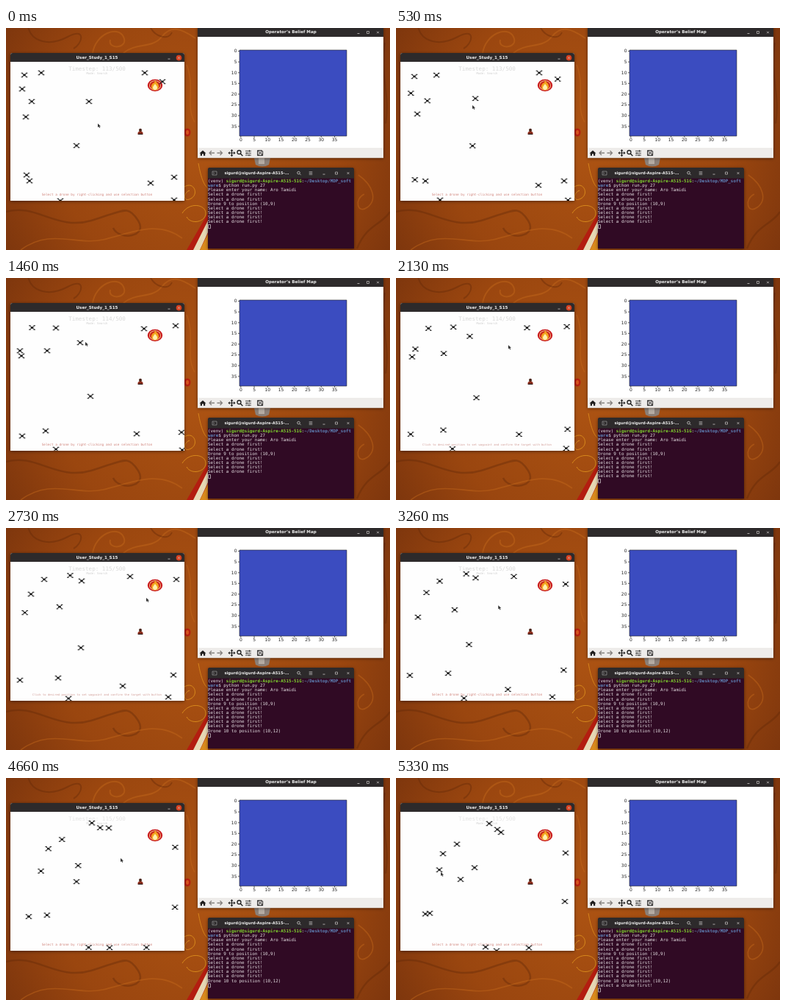
An HTML page with a canvas for the animation above (5.4 s loop, 523x302 px).

```html
<!DOCTYPE html>
<html lang="en">
<head>
<meta charset="utf-8">
<title>Drone study</title>
<style>
html, body { margin: 0; width: 100%; height: 100%; overflow: hidden; background: #9a460f; }
canvas { display: block; }
</style>
</head>
<body>
<canvas id="stage" width="523" height="302"></canvas>
<script>
const W = 523, H = 302, LOOP = 5400;
const SANS = '"DejaVu Sans", sans-serif';
const MONO = '"DejaVu Sans Mono", monospace';
const stage = document.getElementById('stage').getContext('2d');
const back = document.createElement('canvas');
back.width = W;
back.height = H;
let g = back.getContext('2d');

function rect(x, y, w, h, fill) {
  g.fillStyle = fill;
  g.fillRect(x, y, w, h);
}
function oval(x, y, rx, ry, fill) {
  g.fillStyle = fill;
  g.beginPath();
  g.ellipse(x, y, rx, ry, 0, 0, 7);
  g.fill();
}
function shape(d, fill) {
  g.fillStyle = fill;
  g.fill(new Path2D(d));
}
function line(d, color, width = 1) {
  g.strokeStyle = color;
  g.lineWidth = width;
  g.stroke(new Path2D(d));
}
function text(s, x, y, font, fill, align = 'left') {
  g.font = font;
  g.fillStyle = fill;
  g.textAlign = align;
  g.textBaseline = 'middle';
  g.fillText(s, x, y);
}
function frame(x, y, w, h, bar, body) {
  g.save();
  g.shadowColor = 'rgba(0,0,0,.5)';
  g.shadowBlur = 4;
  g.shadowOffsetY = 1;
  g.fillStyle = body;
  g.beginPath();
  g.roundRect(x, y, w, h, [3, 3, 0, 0]);
  g.fill();
  g.restore();
  g.fillStyle = '#2d2a2b';
  g.beginPath();
  g.roundRect(x, y, w, bar, [3, 3, 0, 0]);
  g.fill();
}
function buttons(xMin, xMax, xClose, y) {
  const c = '#c9c5c3';
  line(`M${xMin - 1.5} ${y + 1.5}h3`, c, .8);
  if (xMax) line(`M${xMax - 1.5} ${y - 1.5}h3v3h-3z`, c, .7);
  line(`M${xClose - 1.3} ${y - 1.3}l2.6 2.6m0 -2.6l-2.6 2.6`, c, .8);
}

function wallpaper() {
  const fade = g.createRadialGradient(262, 150, 30, 262, 150, 310);
  fade.addColorStop(0, '#ab5212');
  fade.addColorStop(.6, '#9a460f');
  fade.addColorStop(1, '#7c350d');
  rect(0, 0, W, H, fade);
  const swirl = 'rgba(196,104,28,.45)', dark = 'rgba(98,40,8,.4)';
  line('M118 34C122 8 152 -4 160 12S138 30 142 16', swirl, 2);
  line('M160 34C176 20 200 28 212 12S238 0 258 14', swirl, 2);
  line('M30 -2C34 18 58 26 84 12S104 22 92 28', dark, 2);
  line('M196 -2C204 14 222 16 226 6', dark, 2);
  line('M0 250C40 238 70 276 116 262S166 240 180 262 154 290 146 272', dark, 2.5);
  line('M20 302C60 272 96 296 132 288S206 260 240 286', swirl, 1.6);
  line('M480 200C500 214 506 234 492 244S474 232 488 226', swirl, 1.6);
  line('M478 300C492 266 512 268 523 250', dark, 2.5);
  line('M516 20C508 60 524 90 517 130', dark, 2);
  line('M246 50C258 80 244 106 257 128', swirl, 1.5);

  const gold = '#d98a1c';
  line('M243 216C256 208 263 226 252 232S241 224 250 221', gold, 1);
  line('M240 252C250 236 272 240 272 252S252 268 246 257', gold, 1);
  line('M262 184C266 206 270 214 275 218', gold, .9);
  oval(247, 142, 4.5, 5.5, '#b5200f');
  oval(247, 142, 2, 3, '#d8541c');
  shape('M338 177h22l-2 9q-9 5 -18 0z', '#8c8078');
  shape('M344 177h8v8h-8z', '#b5aca3');
  shape('M275 252L246 302H275z', '#b31d10');
  shape('M275 262L255 302H264L275 278z', '#e7d9b4');
  shape('M275 280L264 302H275z', '#d98a1c');
}

function studyWindow() {
  frame(6, 34, 237, 201, 12, '#fefefe');
  text('User_Study_1_S15', 124, 40.7, 'bold 5.6px ' + SANS, '#eee', 'center');
  oval(235.5, 40.6, 3.8, 3.8, '#d8401f');
  buttons(222, 0, 235.5, 40.6);
}

function mapWindow() {
  frame(261, -3, 253, 179.5, 15, '#fff');
  text('Operator\u2019s Belief Map', 388, 6, 'bold 5.6px ' + SANS, '#eee', 'center');
  buttons(480, 493, 506.5, 6);
  rect(318, 30, 146, 117, '#3b4cc0');
  line('M318 30h146v117h-146z', '#222', .6);
  for (let i = 0; i < 8; i++) {
    const x = 319.8 + i * 18.25, y = 31.5 + i * 14.62;
    line(`M${x} 147v2M318 ${y}h-2`, '#222', .7);
    text(i * 5, x, 152.3, '6px ' + SANS, '#222', 'center');
    text(i * 5, 314.5, y + .3, '6px ' + SANS, '#222', 'right');
  }
  rect(261, 163, 253, 13.5, '#eeecea');
  const ink = '#1e1e1e';
  shape('M263.5 170.5l4.5 -4 4.5 4h-1.3v3.3h-2.2v-2.5h-2v2.5h-2.2v-3.3z', ink);
  line('M284 170h-7m3 -3l-3 3 3 3M287.5 170h7m-3 -3l3 3 -3 3', '#85827f', 1.3);
  line('M303.5 170h8M307.5 166v8', ink, 1.2);
  shape('M307.5 165l2 2.2h-4zm0 10l2 -2.2h-4zM302.5 170l2.2 -2v4zm10 0l-2.2 -2v4z', ink);
  line('M315 169a2.5 2.5 0 1 0 5 0a2.5 2.5 0 1 0 -5 0M319.4 171l3 3', ink, 1.3);
  line('M326 167.3h8M326 170.2h8M326 173h8M331.5 166v2.6M328 169v2.5M331 171.8v2.4', ink, .8);
  line('M342.5 166.5h6l1.2 1.2v5.8h-7.2zM344 166.5v2.5h4v-2.5M344 173.5v-2.5h4.5v2.5', ink, .9);
}

function terminal() {
  frame(275, 190, 199, 110, 14.5, '#300a24');
  line('M281 195h6v5h-6zM282.3 196.3l1.4 1.2 -1.4 1.2', '#aaa', .6);
  text('sigurd@sigurd-Aspire-A515-...', 341.5, 197.6, 'bold 5.2px ' + SANS, '#eee', 'center');
  line('M396.7 197a1.8 1.8 0 1 0 3.6 0a1.8 1.8 0 1 0 -3.6 0M400 198.4l1.7 1.7', '#ccc', .8);
  line('M412.7 195.7h4.6M412.7 197.5h4.6M412.7 199.3h4.6', '#ccc', .7);
  buttons(433, 450, 466, 197.5);
}

const ROW = 6.14;
const term = (s, row, x = 275, color = '#e6e1e4', weight = '') =>
  text(s, x, 208.5 + row * ROW, weight + '5.9px ' + MONO, color);

function prompt() {
  const runs = [
    ['(venv) ', '#e6e1e4', ''],
    ['sigurd@sigurd-Aspire-A515-51G', '#7fd42e', 'bold '],
    [':', '#e6e1e4', ''],
    ['~/Desktop/MDP_soft', '#5f83b8', 'bold ']
  ];
  let x = 275;
  for (const [s, color, weight] of runs) {
    term(s, 0, x, color, weight);
    x += g.measureText(s).width;
  }
  term('ware', 1, 275, '#5f83b8', 'bold ');
  term('$ python run.py 27', 1, 275 + g.measureText('ware').width);
  term('Please enter your name: Aro Tamidi', 2);
}

const ASK = 'Select a drone first!';
const LOG = [
  [0, ASK], [0, ASK], [0, 'Drone 9 to position (10,9)'],
  [0, ASK], [0, ASK], [0, ASK], [0, ASK],
  [1700, ASK], [2660, 'Drone 10 to position (10,12)'], [4860, ASK]
];
function log(t) {
  const shown = LOG.filter(([at]) => t >= at);
  shown.forEach(([, s], i) => term(s, i + 3));
  const y = 206 + (shown.length + 3) * ROW;
  line(`M275.5 ${y}h3v5.2h-3z`, '#d8d2d6', .7);
}

// Paths: each digit picks a time from KEYS, followed by one point per digit.
const KEYS = [0, 530, 1460, 2730, 3800, 4660, 5330];
const path = (keys, ...v) =>
  [...keys].map((k, i) => ({ t: KEYS[k], x: v[2 * i], y: v[2 * i + 1] }));

const drones = [
  path('01346', 25, 64, 25, 66, 52, 70, 67, 76, 83, 90),
  path('0246', 48, 61, 68, 68, 104, 61, 127, 62),
  path('02346', 113, 100, 101, 88, 103, 72, 116, 66, 138, 70),
  path('0246', 22, 83, 19, 99, 35, 126, 59, 125),
  path('012346', 27, 121, 29, 117, 21, 106, 34, 90, 49, 89, 64, 103),
  path('0246', 35, 100, 56, 99, 87, 115, 107, 122),
  path('023456', 96, 160, 115, 161, 102, 163, 98, 152, 96, 141, 88, 138),
  path('012356', 189, 61, 195, 61, 188, 69, 169, 66, 140, 68, 143, 74),
  path('02346', 213, 73, 231, 65, 232, 70, 230, 84, 231, 102),
  path('02346', 28, 200, 22, 215, 19, 207, 21, 194, 40, 185),
  path('02346', 32, 208, 54, 208, 71, 204, 67, 191, 46, 184),
  path('0126', 74, 235, 60, 234, 68, 233, 122, 230),
  path('012346', 197, 211, 194, 214, 178, 212, 159, 215, 147, 225, 137, 235),
  path('012346', 229, 203, 229, 208, 239, 210, 228, 200, 230, 186, 230, 168),
  path('0236', 229, 234, 240, 234, 221, 230, 181, 231)
];
const pointer = path('0123456', 125, 130, 104, 105, 108, 87, 191, 95, 86, 116, 156, 109, 61, 128);

function segment(p, t) {
  let i = 0;
  while (i < p.length - 2 && t >= p[i + 1].t) i++;
  return [i, Math.min(1, (t - p[i].t) / (p[i + 1].t - p[i].t))];
}
function glide(p, t) {
  const [i, u] = segment(p, t);
  const a = p[i], b = p[i + 1], dt = b.t - a.t;
  const slope = (k, n) => {
    const l = p[Math.max(0, n - 1)], r = p[Math.min(p.length - 1, n + 1)];
    return (r[k] - l[k]) / (r.t - l.t) * dt;
  };
  const at = k => {
    const m = slope(k, i), n = slope(k, i + 1), d = b[k] - a[k];
    return a[k] + u * (m + u * (3 * d - 2 * m - n + u * (m + n - 2 * d)));
  };
  return [at('x'), at('y')];
}
function ease(p, t) {
  const [i, u] = segment(p, t);
  const s = u * u * (3 - 2 * u), a = p[i], b = p[i + 1];
  return [a.x + (b.x - a.x) * s, a.y + (b.y - a.y) * s];
}

function drone([x, y]) {
  line(`M${x - 3} ${y - 2.2}l6 4.4m0 -4.4l-6 4.4`, '#1c1c1c', 1);
  oval(x, y, 1.7, 1.4, '#111');
  for (const sx of [-1, 1])
    for (const sy of [-1, 1])
      line(`M${x + sx * 3.1 - 1.3} ${y + sy * 2.7}h2.6`, '#2a2a2a', 1.1);
}
function fire(x, y) {
  oval(x, y, 10.2, 8.3, '#c9181a');
  oval(x, y, 8, 6.7, '#f6dfae');
  oval(x, y, 7.3, 6.1, '#cf2a1a');
  shape(`M${x} ${y - 7}c1 3 5 4 5 8.500c0 3 -2 5 -5 5s-5 -2 -5 -5c0 -3 2 -3 2 -5c1 1 2 1 3 -3.500z`, '#f2a51f');
  shape(`M${x} ${y - 2}c1 2 3 3 3 5c0 2 -1 3 -3 3s-3 -1 -3 -3c0 -2 2 -3 3 -5z`, '#fff0b0');
}
function person(x, y) {
  oval(x, y - 2, 2, 2.3, '#4a2418');
  shape(`M${x - 3.5} ${y + 4}v-2q0 -2.500 3.500 -2.500t3.500 2.500v2z`, '#8e2d1c');
  rect(x - 3, y + 2.8, 6, 1.2, '#2d1a1a');
}
function arrow([x, y]) {
  const d = `M${x} ${y}v5.200l1.300 -1.100 1 2 1 -.5 -1 -1.900h1.700z`;
  line(d, '#fff', .8);
  shape(d, '#333');
}

function sim(t) {
  g.save();
  g.beginPath();
  g.rect(6, 46, 237, 189);
  g.clip();
  const step = 113 + (t >= 1400) + (t >= 2600);
  text(`Timestep: ${step}/500`, 124, 56.5, '7.6px ' + MONO, t < 4400 ? '#d9d9d9' : '#e4e4e4', 'center');
  text('Mode: Search', 124, 62.3, '4px ' + MONO, '#cfcfcf', 'center');
  const picked = t >= 1860 && t < 2860;
  const hint = picked
    ? 'Click to desired position to set waypoint and confirm the target with button'
    : 'Select a drone by right-clicking and use selection button';
  text(hint, 124, 227, (picked ? '3.85px ' : '4.4px ') + MONO, picked ? '#d09a94' : '#cf8078', 'center');
  fire(203, 78);
  person(183, 141);
  for (const p of drones) drone(glide(p, t));
  arrow(ease(pointer, t));
  g.restore();
}

wallpaper();
studyWindow();
mapWindow();
terminal();
prompt();
g = stage;

const start = performance.now();
function draw() {
  const t = Math.max(0, performance.now() - start) % LOOP;
  // 15 pictures a second, each starting on a multiple of 10 ms
  const n = Math.ceil((Math.floor(t / 10) * 10 + 10) * 3 / 200) - 1;
  const now = Math.floor(n * 20 / 3) * 10;
  g.drawImage(back, 0, 0);
  sim(now);
  log(now);
  requestAnimationFrame(draw);
}
draw();
</script>
</body>
</html>
```
